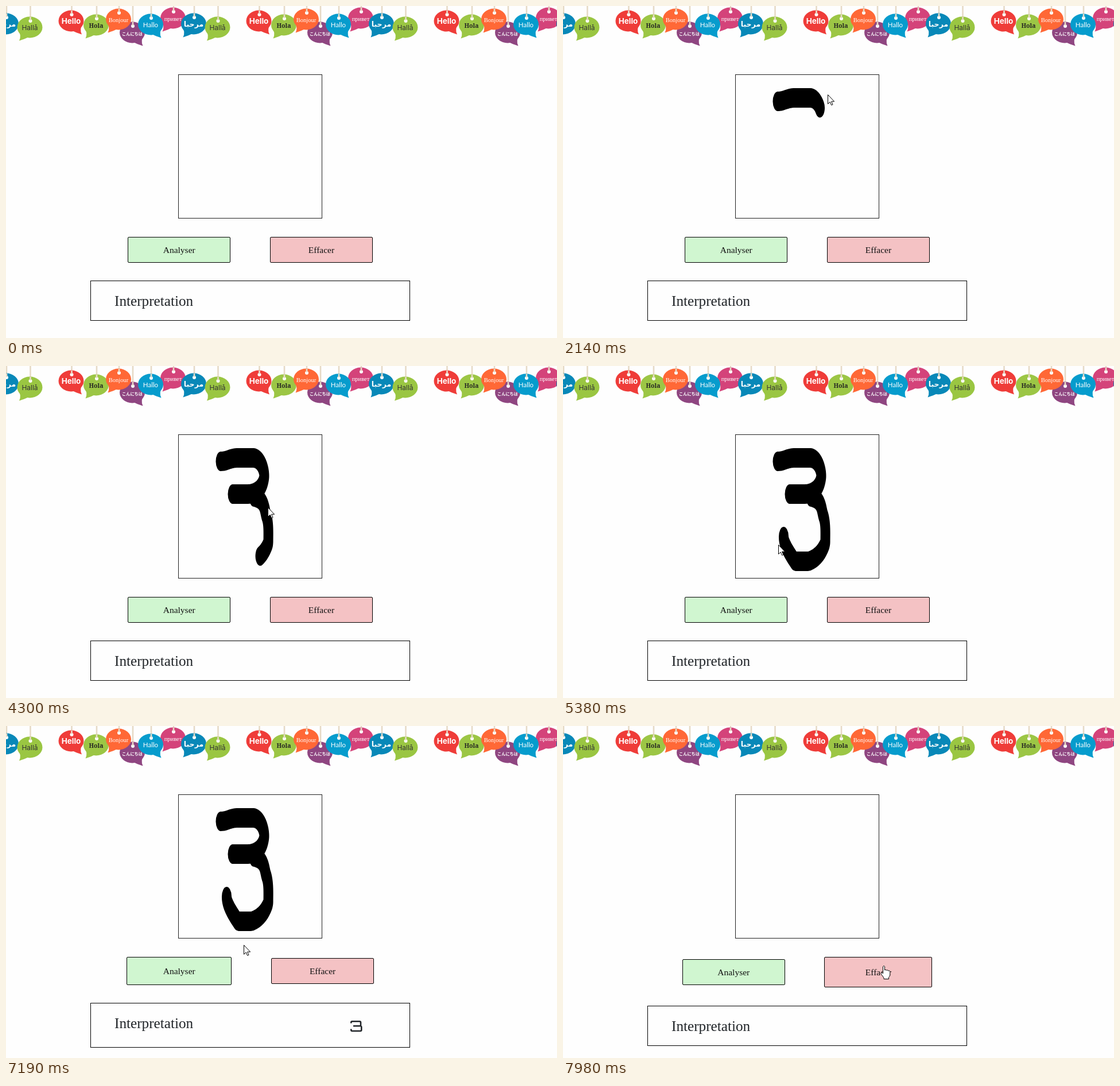
Write an HTML page that moves like this. It is 960 px wide and 578 px high and loops after 8000 ms.

```html
<!DOCTYPE html>
<html lang="fr">
<head>
<meta charset="utf-8">
<title>Interpretation</title>
<style>
  html, body { margin: 0; width: 100%; height: 100%; overflow: hidden; background: #fefefe; }
  svg { display: block; width: 960px; height: 578px; }
  text { text-anchor: middle; }
  .box { fill: #fefefe; stroke: #000; }
  .pad { stroke: #222; }
  .label { font: 15.5px "Playfair Display", "Liberation Serif", serif; fill: #111; }
  .title { font: 25.2px "Playfair Display", "Liberation Serif", serif; fill: #212529; text-anchor: start; }
  .ink { fill: none; stroke: #000; stroke-width: 17; stroke-linecap: round; stroke-linejoin: round; }
  .pointer { fill: #fff; stroke: #000; stroke-linejoin: round; }
</style>
</head>
<body>
<svg viewBox="0 0 960 578">
  <defs>
    <g id="garland"></g>
    <path id="upper" d="M374 166C386 166 390 160 404 160H432C444 162 450 180 450 192C448 212 436 223 421 223H395"/>
    <path id="lower" d="M432 228C452 232 450 252 454 262C458 275 457 292 457 308C452 322 444 334 428 340H404C396 328 384 310 384.5 297"/>
  </defs>
  <use href="#garland" x="-327"/>
  <use href="#garland"/>
  <use href="#garland" x="327"/>
  <use href="#garland" x="654"/>

  <rect class="box pad" x="300.5" y="119.5" width="250" height="250"/>
  <!-- The pad is stretched vertically, so the round brush becomes a tall ellipse. -->
  <g id="ink" transform="scale(1 2)"><path class="ink"/><path class="ink"/></g>

  <g id="analyse"><rect rx="1.5" stroke="#000" fill="#d0f6d0"/><text class="label">Analyser</text></g>
  <g id="erase"><rect rx="1.5" stroke="#000" fill="#f4c2c4"/><text class="label">Effacer</text></g>

  <g id="panel">
    <rect class="box" x="147.5" y="478.5" width="556" height="69"/>
    <text class="title" x="189" y="522">Interpretation</text>
    <path id="result" role="img" aria-label="3" fill="none" stroke="#212529" stroke-width="2.6" stroke-linejoin="round"
      d="M601.3 513.5V512Q601.3 510.3 603 510.3H616Q618 510.3 618 512.3V518.2H605M618 518.2Q619.3 518.5 619.3 520V525Q619.3 527 617.3 527H603Q601.3 527 601.3 525.3V523.5"/>
  </g>

  <path id="arrow" class="pointer" d="M.5.5V16.5L4.2 13 6.6 18.6 9 17.6 6.6 12.2H11.6Z"/>
  <path id="hand" class="pointer" d="M-1.5 1.8Q0-.9 1.5 1.8V8Q3 6.5 4.5 8.2Q6 7 7.5 9Q9.8 8 10.8 10.5V16Q10.5 19 8.5 20.5V23.5H0V21.5Q-1 19.5-4.5 15.5Q-5.8 12.5-4 12Q-2.5 12-1.5 14Z"/>
</svg>
<script>
const LOOP = 8000, GROW = 9;
const $ = id => document.getElementById(id);

function setAttrs(node, attrs) {
  for (const name in attrs) node.setAttribute(name, attrs[name]);
}

function show(node, visible) {
  node.setAttribute("visibility", visible ? "visible" : "hidden");
}

// A hanging speech bubble; side is +1 for a tail to the right, -1 to the left.
function bubble(x, y, side, fill, text, font, ink = "#fff") {
  const px = k => x + side * k;
  return `<path d="M${x + 1} 0V${y - 14}" stroke="#e6dac6" stroke-width="2.6"/>
    <g fill="${fill}"><ellipse cx="${x}" cy="${y}" rx="22" ry="18.5"/>
    <path d="M${px(20)} ${y + 6}Q${px(14)} ${y + 14} ${px(18.5)} ${y + 23.5}Q${px(8)} ${y + 20} ${px(2)} ${y + 17}Z"/></g>
    <circle cx="${x + 1}" cy="${y - 11}" r="3" fill="#fff"/>
    <path d="M${x + 1} ${y - 18}v6" stroke="#e6dac6" stroke-width="2.6"/>
    <text x="${x}" y="${y + 4.5}" fill="${ink}" style="font:${font}">${text}</text>`;
}

$("garland").innerHTML = [
  bubble(220, 46, 1, "#8f4681", "こんにちは", "bold 7.2px 'Noto Sans CJK JP','Noto Sans CJK',sans-serif"),
  bubble(113.5, 26, 1, "#ef3c39", "Hello", "bold 13.5px Inter,sans-serif"),
  bubble(157, 33, -1, "#9cc645", "Hola", "bold 10.5px 'Noto Serif',serif", "#222"),
  bubble(196, 23, -1, "#ff6836", "Bonjour", "10.5px 'Liberation Serif',serif"),
  bubble(291, 21, -1, "#d4437a", "привет", "10.5px 'Liberation Serif',serif"),
  bubble(252, 32, 1, "#069ccd", "Hallo", "11.5px Lato,sans-serif"),
  bubble(327, 31, -1, "#0888b8", "مرحبا", "bold 12.5px 'DejaVu Sans',sans-serif"),
  bubble(368.5, 37, -1, "#9ac642", "Hallå", "12px Inter,sans-serif", "#333")
].join("");

const clamp = u => Math.min(1, Math.max(0, u));
const progress = (t, start, end) => clamp((t - start) / (end - start));
const ease = (t, start) => 1 - (1 - progress(t, start, start + 300)) ** 2.2;

const strokes = [
  { guide: $("upper"), start: 1300, end: 3030 },
  { guide: $("lower"), start: 3520, end: 4900 }
];

function strokeLength(s, t) {
  return s.guide.getTotalLength() * progress(t, s.start, s.end);
}

function strokePath(s, t) {
  if (t < s.start) return "";
  const length = strokeLength(s, t);
  const steps = Math.ceil(length / 3) + 1;
  const points = Array.from({ length: steps + 1 }, (_, i) => {
    const p = s.guide.getPointAtLength(length * i / steps);
    return `${p.x} ${p.y / 2}`;
  });
  return "M" + points.join("L");
}

// Where the pointer is while the brush is on the pad
function drawingPointer(s, t) {
  const p = s.guide.getPointAtLength(strokeLength(s, t));
  return [460 + (p.x - 447) * 1.1, 120 + (p.y - 120) * .6];
}

const [upper, lower] = strokes;
const stops = [
  [190, 739, 379],
  [880, ...drawingPointer(upper, 0)],
  [upper.start, ...drawingPointer(upper, 0)],
  [upper.end, ...drawingPointer(upper, LOOP)],
  [3440, 432, 176],
  [lower.start, ...drawingPointer(lower, 0)],
  [lower.end, ...drawingPointer(lower, LOOP)],
  [5160, 375, 219],
  [5380, 375, 311],
  [5940, 334, 404],
  [6240, 334, 417],
  [6950, 334, 417],
  [7270, 440, 369],
  [7500, 553, 396],
  [7730, 558, 403],
  [7900, 559, 417]
];

function pointerAt(t) {
  const active = strokes.find(s => t >= s.start && t < s.end);
  if (active) return drawingPointer(active, t);
  const next = stops.findIndex(stop => stop[0] > t);
  if (next <= 0) return stops.at(next).slice(1);
  const [t0, x0, y0] = stops[next - 1];
  const [t1, x1, y1] = stops[next];
  const u = progress(t, t0, t1);
  return [x0 + (x1 - x0) * u, y0 + (y1 - y0) * u];
}

function placeButton(id, left, grow, rowGrow) {
  const [rect, label] = $(id).children;
  const y = 402 + (rowGrow - grow) / 2;
  setAttrs(rect, {
    x: Math.round(left) + .5,
    y: Math.floor(y) + .5,
    width: Math.round(178 + grow),
    height: Math.floor(44 + grow)
  });
  setAttrs(label, { x: left + 89.7 + grow / 2, y: y + 28 + grow / 2 });
}

function render(t) {
  const analyse = GROW * (ease(t, 5940) - ease(t, 7100));
  const erase = GROW * ease(t, 7730);
  const rowGrow = Math.max(analyse, erase);
  placeButton("analyse", 212 - (analyse + erase) / 2, analyse, rowGrow);
  placeButton("erase", 459.8 + (analyse - erase) / 2, erase, rowGrow);

  const cleared = t >= 7900;
  const answered = t >= 6480 && !cleared;
  setAttrs($("panel"), { transform: `translate(0 ${Math.round(rowGrow)})` });
  setAttrs($("panel").children[0], { height: answered ? 77 : 69 });
  show($("result"), answered);

  strokes.forEach((s, i) => setAttrs($("ink").children[i], { d: cleared ? "" : strokePath(s, t) }));

  const hovering = (t >= 5940 && t < 7100) || t >= 7730;
  const [x, y] = pointerAt(t).map(Math.round);
  for (const id of ["arrow", "hand"]) setAttrs($(id), { transform: `translate(${x} ${y})` });
  show($("arrow"), t >= 190 && !hovering);
  show($("hand"), hovering);
}

function tick() {
  render(performance.now() % LOOP);
  requestAnimationFrame(tick);
}
tick();
</script>
</body>
</html>
```
